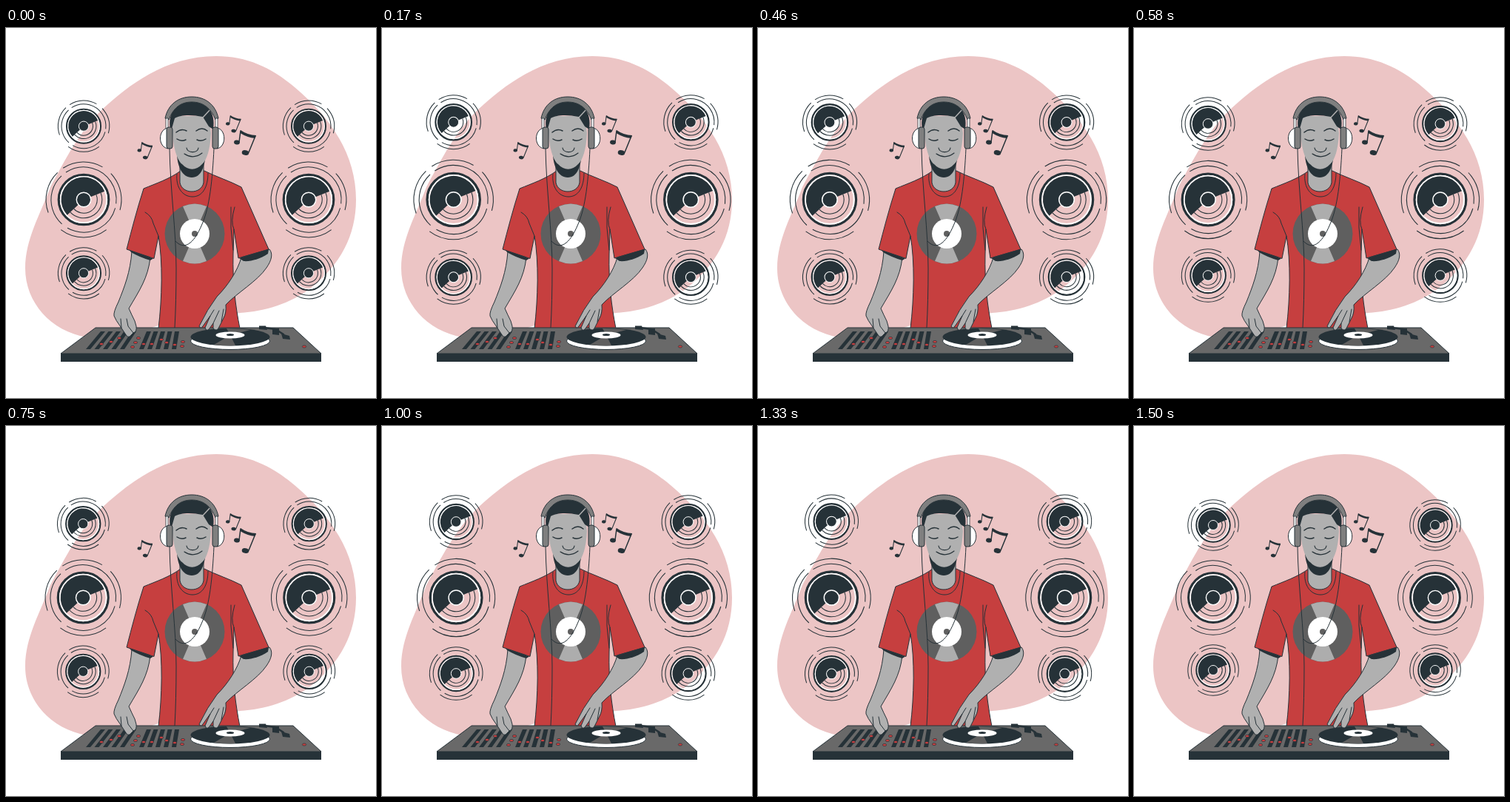
Recreate the animation shown at these times as an HTML page. Size 500 by 500 pixels, loop 1.54 s.

```html
<!DOCTYPE html>
<html lang="en">
<head>
<meta charset="utf-8">
<title>DJ set</title>
<style>
html, body { margin: 0; width: 100%; height: 100%; overflow: hidden; background: #fff; }
svg { display: block; width: 100vw; height: 100vh; }
.ink { fill: #263238; stroke: none; }
.line { fill: none; stroke: #263238; stroke-linecap: round; stroke-linejoin: round; }
.edge { stroke: #263238; stroke-linejoin: round; }
.skin { fill: #b0b0b0; }
.red { fill: #c63f3f; }
.pad { fill: #7f7f7f; }
.disc { fill: #5f5f5f; }
.white { fill: #fff; }
</style>
</head>
<body>
<svg viewBox="0 0 500 500">
  <defs>
    <g id="speaker">
      <g class="line" style="stroke-linecap:butt">
        <circle r="50.3" pathLength="360" transform="rotate(53)" stroke-dasharray="74 33 66 11 63 16 60 37"/>
        <circle r="43.5" pathLength="360" transform="rotate(15)" stroke-dasharray="105 12 95 10 130 8"/>
        <circle r="24.5" pathLength="360" transform="rotate(-22)" stroke-dasharray="159 201"/>
        <circle r="18" pathLength="360" transform="rotate(-22)" stroke-dasharray="159 201"/>
        <circle r="33.3" stroke-width="3.2"/>
        <circle r="30.8" style="stroke:#fff" stroke-width="1.8"/>
      </g>
      <path class="ink" d="M0 0L-22 20.400A30 30 0 1 1 27.800-11.200Z"/>
      <circle class="ink" r="9.6" style="stroke:#fff" stroke-width="1.4"/>
    </g>
    <g id="rack">
      <use href="#speaker"/>
      <use href="#speaker" stroke-width="1.45" transform="translate(0 -98) scale(.68)"/>
      <use href="#speaker" stroke-width="1.45" transform="translate(0 98) scale(.68)"/>
    </g>
    <g id="note">
      <path class="line" stroke-width="1.5" d="M9 1L7 16M29 8L20 30"/>
      <path class="ink" d="M9 0Q19 7 30 7L28.500 11Q18 10 8.500 4Z"/>
      <ellipse class="ink" cx="4" cy="16.500" rx="4" ry="3" transform="rotate(10 4 16.500)"/>
      <ellipse class="ink" cx="15.500" cy="30.500" rx="4.800" ry="3.300" transform="rotate(10 15.500 30.500)"/>
    </g>
  </defs>

  <path fill="#ecc5c5" d="M26 325C26 285 46 253 60 215C80 178 99 140 130 110C165 78 215 38 284 38C325 38 358 53 390 80C440 122 473 172 473 232C473 280 452 320 411 352C385 372 350 383 316 385C260 390 235 392 203 403C168 415 140 422 110 418C60 410 26 370 26 325Z"/>

  <g id="speakers">
    <use href="#rack" x="-150"/>
    <use href="#rack" x="150"/>
  </g>

  <use href="#note" transform="translate(308 138)"/>
  <use href="#note" transform="translate(297 118) scale(.69)"/>
  <use href="#note" transform="translate(177.500 154) scale(.69)"/>

  <!-- shirt -->
  <path class="red edge" d="M236 193C221 204 203 210 186 217C177 245 170 272 163 299L200 311.500 206 281C212 315 211 365 206 406H316C310 375 306 345 307 305L308 272 314 311 355 299L318 215C303 207 284 201 268 193Z"/>
  <path class="line" d="M188 249Q197 254 199 264L206 281M309 242Q303 262 308 272M304 242V270L307 300M231 197C229 216 239 228 252 228S273 216 273 196"/>
  <path class="skin edge" d="M235 180V209C238 225 264 225 267 209V180Z"/>

  <circle class="disc" cx="255" cy="278" r="40.500"/>
  <path fill="#adadad" d="M255 278L239 241Q255 234 271 241ZM255 278L239 315Q255 322 271 315Z"/>
  <circle class="white" cx="255" cy="278" r="20"/>
  <circle class="disc" cx="255" cy="278" r="4"/>

  <!-- head -->
  <path class="ink" d="M231 172C232 187 238 202 251 202S268 187 270 172Z"/>
  <path class="skin" d="M225 119H274L277 142C276 165 271 179 265 184C257 193 246 193 238 184C231 179 226 160 225 142Z"/>
  <path class="ink" d="M222 136C218 114 232 99 251 99S284 113 280 137L274 133 266 120C251 117 236 117 228 122L224 136Z"/>
  <path stroke="#b0b0b0" stroke-width="1.500" d="M266 121L277 109"/>
  <path class="line" stroke-width="1.500" d="M230 141Q237 135 244 139M257 139Q265 133 272 139M231 150Q237 154 243 151M258 151Q264 154 270 150"/>
  <path class="line" stroke-width="1.200" d="M244 162C245 169 259 170 260 162M241 170Q253 178 265 169"/>

  <!-- headphones -->
  <path class="pad edge" d="M215 122C219 103 233 93 251 93S283 103 287 122L283 124C277 108 266 100 251 100S226 108 220 124Z"/>
  <path class="white edge" stroke-width=".8" d="M216 122H219V136H216ZM283 122H286V136H283Z"/>
  <path class="white edge" d="M219 135C205 137 205 161 219 163ZM285 135C298 137 298 161 285 163Z"/>
  <g class="pad edge">
    <rect x="217" y="134" width="8" height="29" rx="3"/>
    <rect x="279" y="134" width="8" height="29" rx="3"/>
  </g>
  <path class="line" d="M221 163C222 220 230 275 230 325Q230 370 228 405M281 163C279 205 275 243 265 265C253 294 240 300 229 288"/>

  <!-- deck -->
  <path class="edge" fill="#696969" d="M121 405H388L426 440H74Z"/>
  <path class="ink" d="M74 440H426V451H74Z"/>
  <g id="faders"></g>
  <g class="red edge" stroke-width=".6" id="knobs"></g>
  <ellipse class="white edge" cx="303" cy="423" rx="53.500" ry="11.500"/>
  <ellipse class="ink" cx="303" cy="417.500" rx="53.500" ry="12"/>
  <path class="disc" d="M303 415L281 428Q296 430 310 429ZM303 415L298 406Q316 406 330 408Z"/>
  <ellipse class="white" cx="303" cy="415" rx="19.500" ry="4.500"/>
  <ellipse class="ink" cx="303" cy="414.500" rx="5" ry="1.500"/>
  <path class="line" stroke-width="2.500" d="M349 405L364 407 375 414"/>
  <path class="ink" d="M342 402.500L351 402.500 353 408 342 407ZM360 406H369V415L360 414ZM372 413L383 416 384 421 374 420Z"/>

  <!-- arms -->
  <path class="skin edge" d="M170 302C168 330 160 350 152 370Q145 384 146 389Q149 396 153 401L163 416Q166 419 169 415L172 412Q177 411 176 403L174 396Q170 388 166 379C180 355 192 338 195 310Z"/>
  <path class="line" d="M155 393L156 405M163 393L165 403 172 412"/>
  <path class="ink" d="M167 300.500L199 311.500 195 314Q181 310 169 303Z"/>
  <path class="skin edge" d="M318 310C313 328 300 348 285 363Q272 380 261 403Q263 407 266 403L276 389 269 405Q271 411 275 406L280 399 280 406Q285 411 288 404L294 392Q298 385 297 374C312 358 340 342 352 324C359 314 361 305 356 299Z"/>
  <path class="line" d="M276 389L281 381M280 399L288 382M291 397L294 380"/>
  <path class="ink" d="M315 311L355 299 354 305C344 312 330 316 321 315Z"/>
</svg>
<script>
const LOOP = 1540, STEP = 125 / 3, FRAMES = 37;
// [time, scale] knots of the double beat
const BEAT = [[-40, 1], [260, 1.1], [860, 1], [1168, 1.101], [1500, 1]];
const byId = id => document.getElementById(id);
const speakers = byId('speakers');

function fader(x, width) {
  return `<path class="ink" d="M${x} 434L${x + width} 410h6L${x + 6} 434Z"/>`;
}
byId('faders').innerHTML = [0, 1, 2, 3, 4].map(i =>
  fader(108 + i * 11.5, 20 - i) + fader(180 + i * 11, 10 - i * 1.5)).join('');

const knob = ([x, y]) => `<ellipse cx="${x}" cy="${y}" rx="2.7" ry="1.6"/>`;
byId('knobs').innerHTML = [
  [179, 419], [175, 425], [171, 431], [186, 427], [239, 424], [238, 430],
  [129, 427], [142, 424], [153, 419], [197, 427], [210, 421], [217, 425], [228, 428], [403, 430.5]
].map(knob).join('');

function beatScale(time) {
  const i = BEAT.findIndex(([end]) => time <= end);
  const [t0, s0] = BEAT[i - 1], [t1, s1] = BEAT[i];
  return s0 + (s1 - s0) * (time - t0) / (t1 - t0);
}

function draw(now) {
  const step = Math.min(FRAMES - 1, Math.floor((now % LOOP + 5) / STEP));
  speakers.setAttribute('transform', `translate(257 232) scale(${beatScale(step * STEP)})`);
  requestAnimationFrame(draw);
}
draw(performance.now());
</script>
</body>
</html>
```
